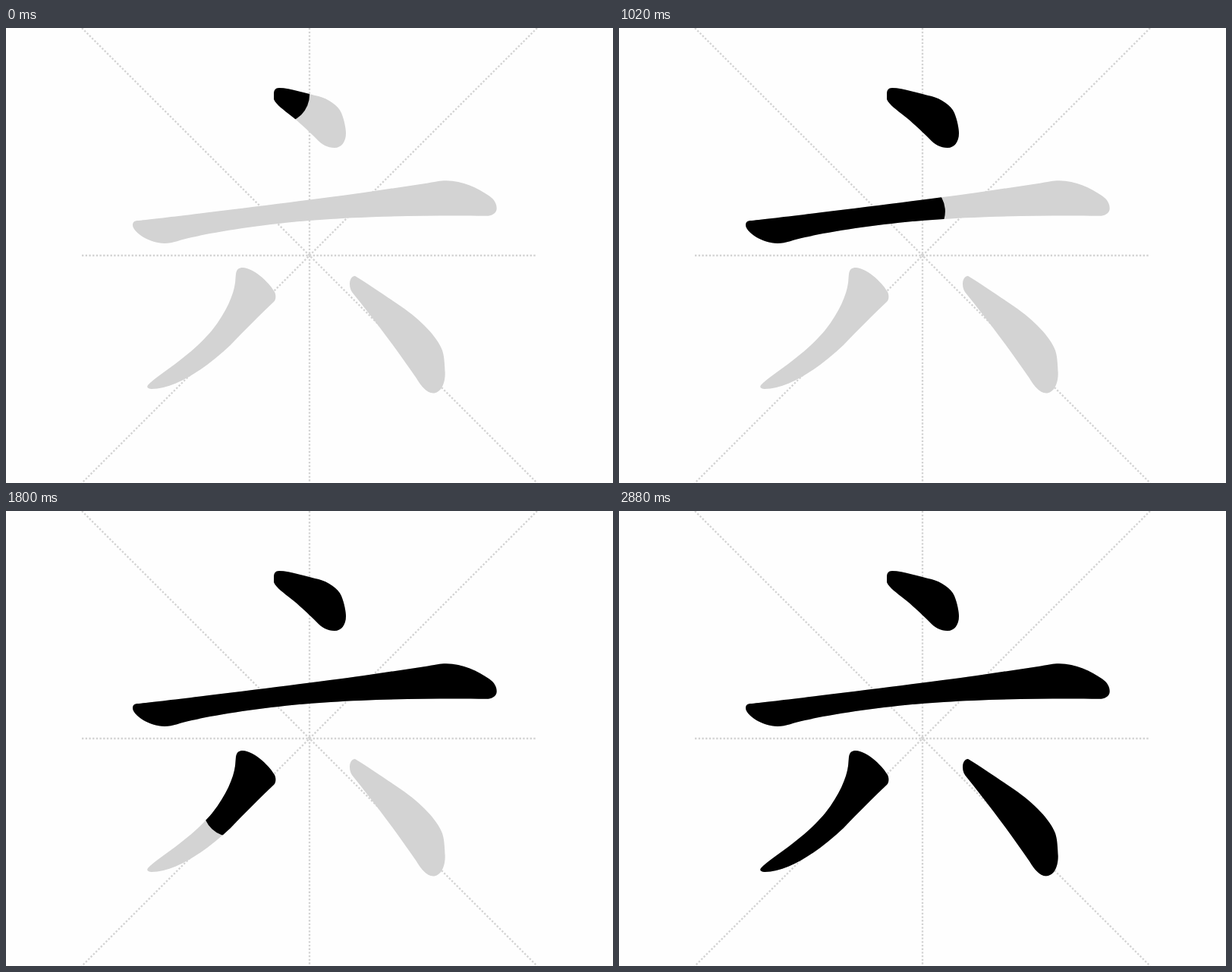
An HTML page for the animation above (3000 ms loop, 800 px wide and 600 px high).

```html
<!DOCTYPE html>
<html lang="zh">
<head>
<meta charset="utf-8">
<title>Stroke order</title>
<style>
  html, body { margin: 0; width: 100%; height: 100%; overflow: hidden; background: #fefefe; }
  svg { display: block; }
  .grid { fill: none; stroke: lightgray; stroke-width: 1; stroke-dasharray: 1 1; }
  .ghost { fill: lightgray; }
  .ink { fill: none; stroke: #000; stroke-width: 75; stroke-linecap: round; stroke-linejoin: round; }
</style>
</head>
<body>
<svg width="800" height="600" viewBox="0 0 800 600">
  <path class="grid" transform="translate(100) scale(2.34375)" d="M0 0L256 256M256 0L0 256M128 0V256M0 128H256"/>
</svg>
<script>
const LOOP = 3000, STEP = 60, LAST = 2880;

// outline, brush path, start in ms, brush speed in px per ms
const strokes = [
  {
    outline: 'M353 87C353 82 355 79 360 79C374 79 398 87 412 90C424 93 438 102 442 112C446 122 448 133 448 139C448 150 442 158 433 158C424 158 416 154 409 146C398 135 385 123 376 116C366 108 356 101 353 94Z',
    path: 'M362.6 88C392 104 412 122 432 146',
    start: 0, speed: .135
  },
  {
    outline: 'M167 260C167 256 169 254 175 254C215 250 400 227 470 217.3L556 204.5C566 202.5 572 201.2 580 201.2C602 201.2 622 211 637 221.5C644 226.5 646.7 232 646.7 238C646.7 244.5 640 247.8 633 247.8C570 247 490 248 428 252C360 256 290 266 245 276C230 279 220 284 209 284C189 284 167 269 167 260Z',
    path: 'M178 260L212 266L251 261L392 242L552 226.5L600 226L640 238',
    start: 291, speed: .297
  },
  {
    outline: 'M303 324C304 318 307 316 312 316C326 317 345 333 354 348C356 352 356 358 353 361C335 378 315 398 296 418C265 447 225 476 192 476C187 476 185 474 187 471C195 462 212 452 230 437.5C250 422 263 409 272 398C290 375 300 352 302 336Z',
    path: 'M310 318L323 352L316 372L298 391L264 427L225 458L190 474',
    start: 1381, speed: .203
  },
  {
    outline: 'M453 338C453 331 456 327 460 327C478 338 500 353 520.5 367C548 386 568 407 575 425C578 434 578 445 578.7 455C578.7 471 572 481.5 563 481.5C554 481 547 472 541 462C524 438 508 415 493 395.5C482 381 471 367 459 352C455 348 453 343 453 338Z',
    path: 'M460 332L484 359L540 415L564 462',
    start: 2088, speed: .188
  }
];

const svg = document.querySelector('svg');

function add(parent, tag, attrs) {
  const el = document.createElementNS('http://www.w3.org/2000/svg', tag);
  for (const name in attrs) el.setAttribute(name, attrs[name]);
  return parent.appendChild(el);
}

strokes.forEach((s, i) => {
  add(add(svg, 'clipPath', { id: 'clip' + i }), 'path', { d: s.outline });
  add(svg, 'path', { class: 'ghost', d: s.outline });
  s.ink = add(svg, 'path', { class: 'ink', d: s.path, 'clip-path': `url(#clip${i})` });
});

function draw(now) {
  const t = Math.min(LAST, Math.floor(now % LOOP / STEP) * STEP);
  for (const { ink, start, speed } of strokes) {
    const drawn = (t - start) * speed;
    ink.style.visibility = drawn < 0 ? 'hidden' : 'visible';
    ink.style.strokeDasharray = `${Math.max(0, drawn)} 9999`;
  }
}

const began = performance.now();
function tick() {
  draw(performance.now() - began);
  requestAnimationFrame(tick);
}
tick();
</script>
</body>
</html>
```
